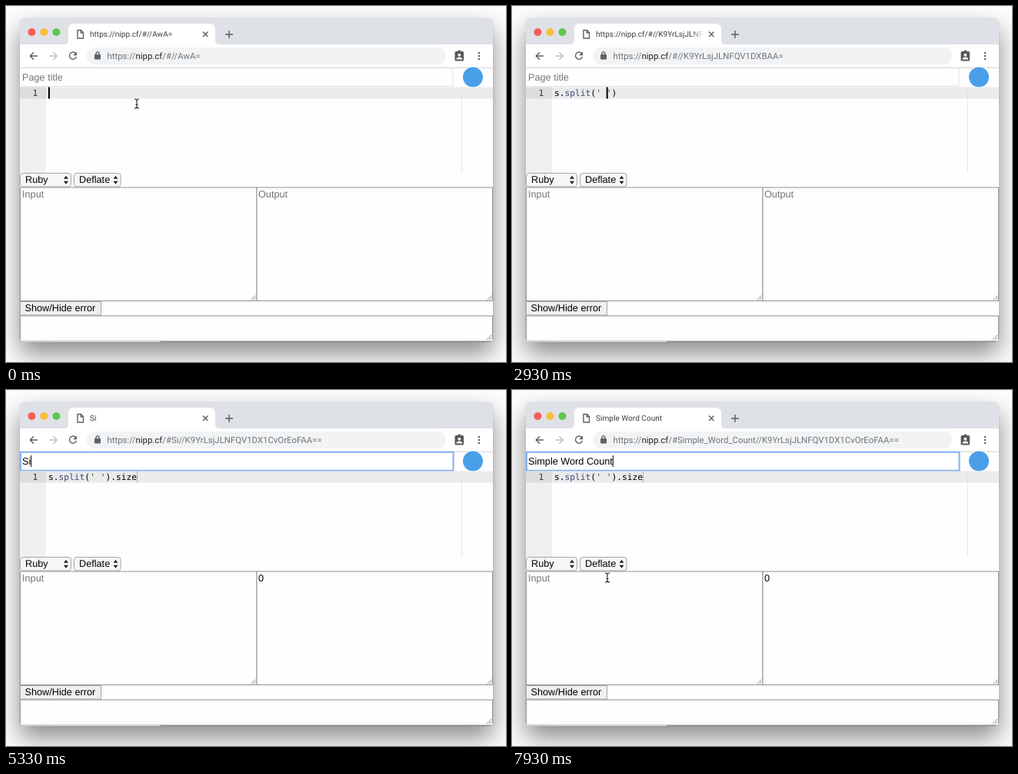
These frames come from a looping animation (650 px wide and 463 px high, 8000 ms). An HTML page:

```html
<!DOCTYPE html>
<html lang="en">
<head>
<meta charset="utf-8">
<title>Code editor</title>
<style>
  html, body { margin: 0; width: 100%; height: 100%; overflow: hidden; background: #fefdfe; }
  #window { position: absolute; left: 18px; top: 16px; width: 615px; height: 421px; border-radius: 5px;
    box-shadow: 0 0 1px rgba(0,0,0,.4), 0 15px 32px rgba(0,0,0,.46); }
  svg { position: absolute; left: 0; top: 0; display: block; }
  text { white-space: pre; text-rendering: geometricPrecision; }
  .ui { font: 11.4px Roboto, sans-serif; fill: #70757a; }
  .tab { font-size: 10.1px; fill: #3c4043; }
  .page { font: 12.7px "Liberation Sans", Arial, sans-serif; }
  .code { font: 11.24px "DejaVu Sans Mono", monospace; }
  .hint { fill: #757575; }
  .icon { fill: none; stroke: #5a5e63; stroke-width: 1.4; }
  .box { fill: #fefdff; stroke: #929292; }
  .control { fill: #f6f6f7; stroke: #a4a4a4; }
</style>
</head>
<body>
<div id="window"></div>
<svg width="650" height="463" viewBox="0 0 650 463">
  <defs>
    <clipPath id="frame"><rect x="18" y="16" width="615" height="421" rx="5"/></clipPath>
    <clipPath id="tabClip"><rect x="105" y="24" width="145" height="25"/></clipPath>
    <linearGradient id="fade"><stop stop-color="#fff" stop-opacity="0"/><stop offset="1" stop-color="#fff"/></linearGradient>
    <path id="grip" d="M-6 0L0-6M-3 0L0-3" fill="none" stroke="#777" stroke-width=".8"/>
    <path id="arrows" d="M-3-1.5L0-5.5L3-1.5ZM-3 1.5L0 5.5L3 1.5Z" fill="#222"/>
  </defs>
  <g clip-path="url(#frame)">
    <rect x="18" y="16" width="615" height="421" fill="#fefdff"/>

    <!-- tab strip -->
    <rect x="18" y="16" width="615" height="34" fill="#dee1e6"/>
    <circle cx="33.5" cy="34" r="5" fill="#f45f57"/>
    <circle cx="49.5" cy="34" r="5" fill="#fabd3e"/>
    <circle cx="65.5" cy="34" r="5" fill="#5fc454"/>
    <path d="M75 50q6 0 6-6V30q0-7 7-7H265q7 0 7 7V44q0 6 6 6Z" fill="#fff"/>
    <path class="icon" stroke-width="1.2" d="M93 31.5h4.5l3 3V42H93ZM97.300 31.500v3.200h3.200"/>
    <g clip-path="url(#tabClip)">
      <text class="ui tab" id="tabText" x="109" y="40.300"/>
      <rect x="232" y="25" width="18" height="22" fill="url(#fade)"/>
    </g>
    <path class="icon" d="M256 33.500l6.500 6.500m0-6.500l-6.500 6.500M285 37h10M290 32v10"/>

    <!-- toolbar -->
    <rect x="18" y="50" width="615" height="30" fill="#fff"/>
    <path class="icon" d="M41 65H31.500M36 60.300L31.300 65L36 69.700"/>
    <path class="icon" style="stroke:#bcbfc3" d="M56.500 65H66M61.500 60.300L66.200 65L61.500 69.700"/>
    <path class="icon" d="M90.700 61.700A4.600 4.600 0 1 0 91.500 66"/>
    <path d="M92 59.500v4.800h-4.800Z" fill="#5a5e63"/>
    <rect x="105" y="54" width="467" height="22" rx="11" fill="#f1f3f4"/>
    <rect x="115" y="63" width="8" height="6.500" rx="1" fill="#5f6368"/>
    <path class="icon" d="M117 63.500v-1.600a2 2 0 0 1 4 0v1.600"/>
    <text class="ui" x="131.500" y="69">https://<tspan fill="#202124">nipp.cf</tspan><tspan id="urlPath"/></text>
    <rect x="583.500" y="59" width="11.500" height="12.500" rx="1.500" fill="#55595e"/>
    <circle cx="589.300" cy="59" r="1.700" fill="#55595e"/>
    <circle cx="589.300" cy="63.700" r="1.900" fill="#fff"/>
    <path d="M585.500 69.500q0-3 3.800-3t3.800 3Z" fill="#fff"/>
    <g fill="#5a5e63"><circle cx="615" cy="61" r="1.200"/><circle cx="615" cy="65" r="1.200"/><circle cx="615" cy="69" r="1.200"/></g>

    <!-- title field -->
    <path d="M18 80.300H633" stroke="#d2d2d4"/>
    <path d="M19 104.500H581V80" fill="none" stroke="#e4e3e6"/>
    <rect id="focusRing" x="19" y="80.800" width="562.500" height="24" fill="#fff" stroke="#82b1ee" stroke-width="2"/>
    <text class="page" id="titleText" x="21" y="97"/>
    <rect id="titleCaret" y="85" width="1" height="15"/>
    <circle cx="607" cy="92.500" r="13" fill="#4a9fe9"/>

    <!-- editor -->
    <rect x="18" y="105.500" width="34" height="111.500" fill="#f0eff1"/>
    <rect x="18" y="105.500" width="34" height="15" fill="#dddcde"/>
    <rect x="52" y="105.500" width="581" height="15" fill="#ebeaec"/>
    <path d="M592.300 105.500V217" stroke="#e3e2e5"/>
    <text class="code" x="34.500" y="116.700" fill="#333">1</text>
    <text class="code" id="codeText" x="55" y="116.700"/>
    <rect id="codeCaret" y="105.500" height="15"/>

    <!-- controls -->
    <rect class="control" x="18.500" y="217.500" width="66" height="17.500" rx="3.500"/>
    <rect class="control" x="88.500" y="217.500" width="60.500" height="17.500" rx="3.500"/>
    <text class="page" x="25" y="230.300">Ruby</text>
    <text class="page" x="95" y="230.300">Deflate</text>
    <use href="#arrows" x="78" y="226.300"/><use href="#arrows" x="142.500" y="226.300"/>

    <rect class="box" x="18.500" y="236" width="307.500" height="147.500"/>
    <rect class="box" x="326" y="236" width="306.500" height="147.500"/>
    <text class="page hint" x="21" y="249.300">Input</text>
    <text class="page" id="output" x="328" y="249.300"/>
    <use href="#grip" x="324.500" y="382.500"/><use href="#grip" x="631.500" y="382.500"/>

    <rect class="control" x="18.500" y="384.500" width="105" height="17.500" style="fill:#efeff0"/>
    <text class="page" id="errorButton" x="24.500" y="397.300">Show/Hide error</text>
    <rect class="box" x="18.500" y="403" width="614" height="33"/>
    <text class="page" id="errorText" x="20.500" y="416.300"/>
    <use href="#grip" x="631" y="434"/>
    <path d="M18 436.500H201" stroke="#dcdcdc"/><path d="M201 436.500H633" stroke="#8d8d8d"/>
  </g>

  <g id="pointer">
    <path id="arrow" d="M0-1V12L3-0L3 9.500L5.200 14.300L7.500 13.300L5.400 8.700H9.200Z" fill="#000" stroke="#fff" stroke-width=".9"/>
    <path id="beam" d="M-3-6q3 0 3 2q0-2 3-2M0-4V4M-3 6q3 0 3-2q0 2 3 2M-1.500 1.500h3" fill="none" stroke="#222" stroke-width="1.100"/>
  </g>
</svg>
<script>
const LOOP = 8000, FOCUS = 4700, CHAR = 6.767;
const el = id => document.getElementById(id);
el("arrow").setAttribute("d", "M0-1V12L3 9.300L5.200 14.300L7.500 13.300L5.400 8.500H9.300Z");

// [time, text before the caret, text after it]
const code = [
  [0, "", ""], [400, "s", ""], [560, "s.", ""], [760, "s.s", ""], [1000, "s.sp", ""],
  [1260, "s.spl", ""], [1460, "s.spli", ""], [1660, "s.split", ""],
  [1950, "s.split(", ")"], [2250, "s.split('", "')"], [2550, "s.split(' ", "')"],
  [3000, "s.split(' '", ")"], [3130, "s.split(' ')", ""], [3220, "s.split(' ').", ""],
  [3330, "s.split(' ').s", ""], [3430, "s.split(' ').si", ""],
  [3560, "s.split(' ').siz", ""], [3750, "s.split(' ').size", ""]
];
const fullTitle = "Simple Word Count";
const titleTimes = [5130, 5270, 5550, 5700, 5850, 6000, 6180, 6330, 6450, 6560, 6680, 6800,
  7020, 7130, 7250, 7370, 7500];
const pointerPath = [[0, 170, 127], [3900, 170, 127], [4150, 84, 59], [4250, 84, 59],
  [4600, 70, 92], [7650, 70, 92], [7930, 124, 244], [8000, 124, 244]];
const pointerShown = [[0, 400], [3900, 5130], [7650, LOOP]];

// Raw deflate with fixed Huffman codes (literals only), as base64
function deflate(text) {
  let bits = "110";
  for (const c of text) bits += (0x30 + c.charCodeAt(0)).toString(2).padStart(8, "0");
  bits += "0000000";
  let bytes = "";
  for (let i = 0; i < bits.length; i += 8) {
    bytes += String.fromCharCode(parseInt([...bits.slice(i, i + 8)].reverse().join(""), 2));
  }
  return btoa(bytes);
}

function errorFor(text) {
  const method = /\.(s|sp|spl|spli|si|siz)$/.exec(text);
  if (!method) return "";
  const receiver = text.includes("(") ? "[]:Array" : '"":String';
  return `${method[1]}: undefined method \`${method[1]}' for ${receiver}`;
}

function highlight(text) {
  return text.replace(/split|'[^']*'?/g, token =>
    `<tspan fill="${token === "split" ? "#3c4c72" : "#036a07"}">${token}</tspan>`);
}

const show = (id, on) => el(id).setAttribute("visibility", on ? "visible" : "hidden");
const blinkOn = age => age % 1000 < 500;

function pointerAt(t) {
  const i = Math.max(1, pointerPath.findIndex(p => p[0] >= t));
  const [t0, x0, y0] = pointerPath[i - 1], [t1, x1, y1] = pointerPath[i];
  const u = (t - t0) / (t1 - t0), k = u * u * (3 - 2 * u);
  return [x0 + (x1 - x0) * k, y0 + (y1 - y0) * k];
}

function draw(t) {
  const [codeTime, before, after] = code.filter(s => s[0] <= t).pop();
  const source = before + after;
  const typed = titleTimes.filter(time => time <= t).length;
  const title = fullTitle.slice(0, typed);
  const path = `/#${title.trim().replace(/ /g, "_")}//${deflate(source)}`;
  const focused = t >= FOCUS;

  el("tabText").textContent = title || "https://nipp.cf" + path;
  el("urlPath").textContent = path;

  const titleText = el("titleText");
  titleText.textContent = title || "Page title";
  titleText.setAttribute("fill", title ? "#000" : "#757575");
  show("focusRing", focused);
  show("titleCaret", focused && blinkOn(t - (typed ? titleTimes[typed - 1] : FOCUS)));
  el("titleCaret").setAttribute("x", 21 + (title ? titleText.getComputedTextLength() : 0));

  el("codeText").innerHTML = highlight(source);
  const caret = el("codeCaret");
  caret.setAttribute("x", 55 + before.length * CHAR);
  caret.setAttribute("width", focused ? 1 : 2);
  caret.setAttribute("fill", focused ? "#aaa" : "#000");
  show("codeCaret", focused || blinkOn(t - codeTime));

  const done = source.endsWith(".size");
  el("output").textContent = done ? "0" : "Output";
  el("output").setAttribute("fill", done ? "#000" : "#757575");
  const error = errorFor(source);
  el("errorText").textContent = error;
  el("errorButton").setAttribute("fill", error ? "#e0271f" : "#000");

  const [x, y] = pointerAt(t);
  const visible = pointerShown.some(([from, to]) => t >= from && t < to);
  el("pointer").setAttribute("transform", `translate(${x} ${y})`);
  show("arrow", visible && y < 80);
  show("beam", visible && y >= 80);
}

const start = performance.now();
function tick() {
  draw((performance.now() - start) % LOOP);
  requestAnimationFrame(tick);
}
tick();
</script>
</body>
</html>
```
